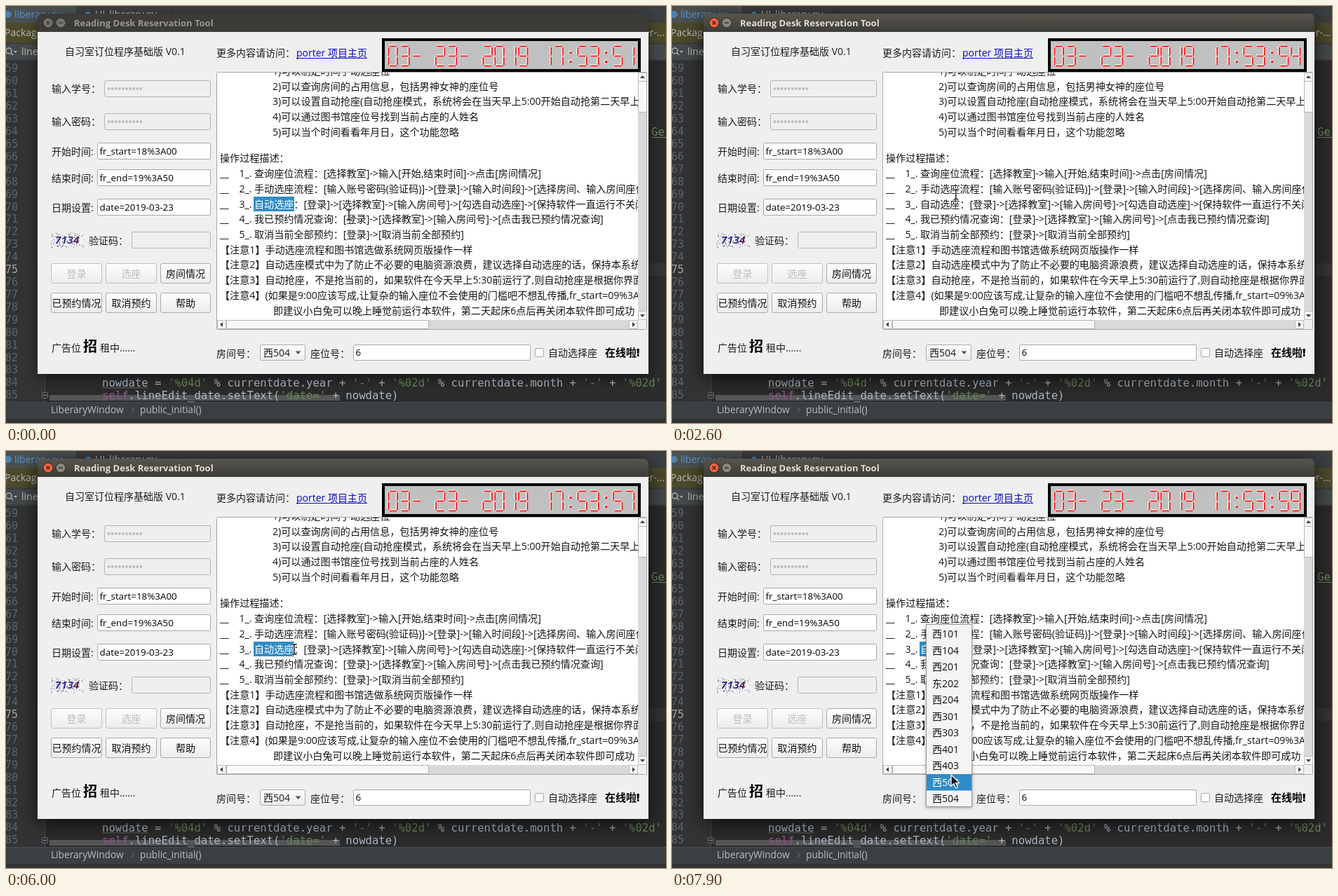
Write an HTML page with a canvas that moves like this. It is 941 px wide and 595 px high and loops after 8000 ms.

```html
<!DOCTYPE html>
<html lang="zh-CN">
<head>
<meta charset="utf-8">
<title>Reading Desk</title>
<style>
html, body { margin: 0; width: 100%; height: 100%; overflow: hidden; background: #2b2b2b; }
canvas { display: block; }
</style>
</head>
<body>
<canvas id="stage" width="941" height="595"></canvas>
<script>
const ctx = document.getElementById('stage').getContext('2d');
const LOOP = 8000;
const SANS = '"Open Sans", "Noto Sans CJK SC", "Noto Sans CJK JP", sans-serif';
const MONO = '"DejaVu Sans Mono", monospace';
const BLUE = '#308cc6';

function rect(x, y, w, h, fill) {
  ctx.fillStyle = fill;
  ctx.fillRect(x, y, w, h);
}

// Text is placed by its left edge and vertical middle.
function text(s, x, y, { size = 14, color = '#1c1c1c', weight = 400, family = SANS, align = 'left' } = {}) {
  ctx.font = `${weight} ${size}px ${family}`;
  ctx.fillStyle = color;
  ctx.textAlign = align;
  ctx.fillText(s, x, y + size * 0.36);
  return ctx.measureText(s).width;
}

function box(x, y, w, h, fill, border, r = 2) {
  ctx.beginPath();
  ctx.roundRect(x + 0.5, y + 0.5, w - 1, h - 1, r);
  ctx.fillStyle = fill;
  ctx.fill();
  ctx.strokeStyle = border;
  ctx.lineWidth = 1;
  ctx.stroke();
}

function poly(points, fill, stroke, width = 1) {
  ctx.beginPath();
  points.forEach(([x, y]) => ctx.lineTo(x, y));
  ctx.closePath();
  if (fill) { ctx.fillStyle = fill; ctx.fill(); }
  if (stroke) { ctx.strokeStyle = stroke; ctx.lineWidth = width; ctx.stroke(); }
}

function line(points, color, width) {
  ctx.beginPath();
  points.forEach(([x, y]) => ctx.lineTo(x, y));
  ctx.strokeStyle = color;
  ctx.lineWidth = width;
  ctx.stroke();
}

function disc(x, y, r, fill) {
  ctx.beginPath();
  ctx.arc(x, y, r, 0, 7);
  ctx.fillStyle = fill;
  ctx.fill();
}

function vertical(y0, y1, a, b) {
  const g = ctx.createLinearGradient(0, y0, 0, y1);
  g.addColorStop(0, a);
  g.addColorStop(1, b);
  return g;
}

function random(seed) {
  return () => (seed = (seed * 16807) % 2147483647) / 2147483647;
}

// ---------- code editor behind the window ----------

function code(parts, x, y) {
  for (const [s, color] of parts) x += text(s, x, y, { size: 15.6, color, family: MONO });
}

function drawEditor() {
  const plain = '#a9b7c6', green = '#6a8759';
  rect(0, 0, 941, 595, '#2b2b2b');
  rect(0, 0, 941, 24, '#3c3f41');
  rect(0, 0, 100, 24, '#4b5052');
  rect(235, 0, 1, 24, '#323232');
  disc(3, 12, 5, '#4a82ad');
  text('liberary.py', 12, 12, { color: '#5c94c8' });
  disc(117, 12, 4, '#4a82ad');
  text('UI_liberary.py', 127, 12, { color: '#bbbbbb' });
  rect(0, 24, 941, 28, '#4c4a2a');
  text('Package', -2, 38, { color: '#bbbbbb' });
  text('er-...', 910, 38, { color: '#bbbbbb' });
  rect(0, 52, 941, 26, '#3c3f41');
  rect(0, 55, 941, 21, '#45494a');
  ctx.beginPath();
  ctx.arc(4, 64, 4, 0, 7);
  ctx.strokeStyle = '#afb1b3';
  ctx.lineWidth = 1.5;
  ctx.stroke();
  line([[7, 67], [10, 70]], '#afb1b3', 1.5);
  poly([[11, 64], [16, 64], [13.5, 67]], '#afb1b3');
  text('line', 22, 65, { color: '#bbbbbb' });

  rect(0, 78, 56, 487, '#313335');
  rect(0, 367, 941, 18, '#343434');
  rect(55, 78, 1, 487, '#484848');
  for (let n = 59; n <= 85; n++) {
    text(String(n), -1, 89 + (n - 59) * 17.92, { size: 15, color: n === 75 ? '#a4a3a3' : '#606366', family: MONO });
  }
  code([['Ge', green]], 920, 179);
  rect(920, 187, 21, 1, '#6a8759');

  code([['nowdate = ', plain], ["'%04d'", green], [' % currentdate.year + ', plain], ["'-'", green],
    [' + ', plain], ["'%02d'", green], [' % currentdate.month + ', plain], ["'-'", green],
    [' + ', plain], ["'%02d'", green]], 137, 537);
  const wave = Array.from({ length: 34 }, (_, i) => [137 + i * 2, 544 + (i % 2) * 1.5]);
  line(wave, '#77776a', 0.8);
  rect(62, 555, 414, 8, 'rgba(120,122,124,.55)');
  code([['self', '#94558d'], ['.lineEdit_date.setText(', plain], ["'date='", green], [' + nowdate)', plain]], 137, 555);
  box(51, 551, 9, 9, '#313335', '#6a6d70', 1);
  line([[53, 555.5], [58, 555.5]], '#8a8d90', 1);

  rect(0, 565, 941, 24, '#3c3f41');
  rect(0, 565, 941, 1, '#4a4d4f');
  rect(0, 589, 941, 6, '#313335');
  text('LiberaryWindow', 64, 576, { size: 13.7, color: '#bbbbbb' });
  line([[179, 573], [182, 576.5], [179, 580]], '#77797b', 1);
  text('public_initial()', 191, 576, { size: 13.7, color: '#bbbbbb' });
}

// ---------- window frame ----------

function drawFrame(focused) {
  ctx.save();
  ctx.shadowColor = focused ? 'rgba(0,0,0,.75)' : 'rgba(0,0,0,.55)';
  ctx.shadowBlur = focused ? 28 : 18;
  ctx.shadowOffsetY = 5;
  ctx.beginPath();
  ctx.roundRect(45, 11, 871, 514, [7, 7, 0, 0]);
  ctx.fillStyle = '#3c3b37';
  ctx.fill();
  ctx.restore();
  ctx.beginPath();
  ctx.roundRect(45, 11, 871, 27, [7, 7, 0, 0]);
  ctx.fillStyle = focused ? vertical(11, 37, '#57554d', '#3d3c38') : '#3c3b37';
  ctx.fill();
  rect(45, 37, 871, 488, '#efefef');

  const mark = focused ? '#3a2a22' : '#3c3b37';
  disc(60, 24, 7.5, focused ? '#2f2e2a' : '#34332f');
  disc(60, 24, 6.5, focused ? '#ee6540' : '#777570');
  line([[57.5, 21.5], [62.5, 26.5]], mark, 1.5);
  line([[62.5, 21.5], [57.5, 26.5]], mark, 1.5);
  disc(78, 24, 7.5, focused ? '#2f2e2a' : '#34332f');
  disc(78, 24, 6.5, focused ? '#8a877c' : '#777570');
  line([[75, 24], [81, 24]], mark, 1.5);
  text('Reading Desk Reservation Tool', 97, 24, { size: 13, weight: 700, color: focused ? '#dfdbd2' : '#99968c' });
}

// ---------- form ----------

function field(x, y, w, h, value = '', enabled = true) {
  box(x, y, w, h, enabled ? '#ffffff' : '#efefef', enabled ? '#a8a8a8' : '#b4b4b4');
  text(value, x + 3.5, y + h / 2, { size: 13.4, color: '#000' });
}

function button(x, y, w, label, enabled = true) {
  box(x, y, w, 29, vertical(y, y + 29, '#fdfdfd', '#ececec'), enabled ? '#ababab' : '#c0c0c0', 2.5);
  text(label, x + w / 2, y + 14.5, { color: enabled ? '#111' : '#bebebe', align: 'center' });
}

function drawCaptcha() {
  const rnd = random(4211);
  rect(64, 324, 47, 21, '#f3f3f5');
  for (let i = 0; i < 150; i++) {
    rect(64 + Math.floor(rnd() * 47), 324 + Math.floor(rnd() * 21), 1, 1, i % 3 ? '#9c9cab' : '#555566');
  }
  [...'7134'].forEach((d, i) => text(d, 70 + i * 8.7, 334, {
    size: 15, weight: 'italic 700', color: i < 3 ? '#2c2c8e' : '#5a234f'
  }));
}

function drawForm() {
  text('自习室订位程序基础版 V0.1', 84, 65);
  text('更多内容请访问：', 300, 67);
  const w = text('porter 项目主页', 414, 67, { color: '#0909c8' });
  rect(414, 74, w, 1, '#0909c8');

  [['输入学号：', 117], ['输入密码：', 164]].forEach(([label, y]) => {
    text(label, 65, y + 1);
    field(140, y - 11, 152, 24, '', false);
    for (let i = 0; i < 10; i++) disc(146.5 + i * 5.1, y + 1, 2, '#bebebe');
  });
  [['开始时间:', 'fr_start=18%3A00', 207], ['结束时间:', 'fr_end=19%3A50', 245], ['日期设置:', 'date=2019-03-23', 287]]
    .forEach(([label, value, y]) => {
      text(label, 65, y + 1);
      field(130, y - 12, 162, 24, value);
    });
  drawCaptcha();
  text('验证码：', 118, 335);
  field(179, 322, 113, 24, '', false);

  button(64, 367, 73, '登录', false);
  button(142, 367, 73, '选座', false);
  button(220, 367, 72, '房间情况');
  button(64, 409, 73, '已预约情况');
  button(142, 409, 73, '取消预约');
  button(220, 409, 72, '帮助');

  text('广告位', 65, 488);
  text('招', 110, 486, { size: 20, weight: 900, color: '#000' });
  text('租中......', 134, 488);

  text('房间号：', 300, 496);
  box(362, 483, 65, 23, vertical(483, 506, '#fdfdfd', '#ececec'), '#ababab');
  text('西504', 367, 495);
  poly([[412.5, 492.5], [420.5, 492.5], [416.5, 497]], '#555');
  text('座位号：', 434, 496);
  field(495, 483, 253, 23, '6');
  box(754, 488, 13, 13, '#fff', '#a8a8a8', 1);
  text('自动选择座', 773, 495);
  text('在线啦!', 854, 495, { size: 15, weight: 900, color: '#000' });
}

// ---------- clock ----------

// Segments in order: top, upper left, upper right, middle, lower left, lower right, bottom.
const SEGMENTS = [[0, 0, 1, 0], [0, 0, 0, 1], [1, 0, 1, 1], [0, 1, 1, 1], [0, 1, 0, 2], [1, 1, 1, 2], [0, 2, 1, 2]];
const DIGITS = {
  0: '012456', 1: '25', 2: '02346', 3: '02356', 4: '1235', 5: '01356',
  6: '013456', 7: '025', 8: '0123456', 9: '012356', '-': '3'
};

function drawDigit(ch, x) {
  const w = 12.5, h = 14, top = 57;
  if (ch === ':') {
    [65, 78].forEach(y => { rect(x + 4.5, y - 1, 4, 4, '#fff'); rect(x + 5.5, y, 3, 3, '#f00808'); });
    return;
  }
  for (const s of DIGITS[ch] || '') {
    const [x0, y0, x1, y1] = SEGMENTS[s];
    const gapX = x0 === x1 ? 0 : 1.3, gapY = y0 === y1 ? 0 : 1.3;
    const from = [x + x0 * w + gapX, top + y0 * h + gapY];
    const to = [x + x1 * w - gapX, top + y1 * h - gapY];
    line([from, to], '#fff4f2', 3.4);
    line([[from[0] + 0.5, from[1] + 0.5], [to[0] + 0.5, to[1] + 0.5]], '#f00808', 1.7);
  }
}

function drawClock(t) {
  const seconds = t < 300 ? 51 : 52 + Math.floor((t - 300) / 1000);
  rect(536, 46, 369, 48, '#000');
  rect(540, 50, 361, 40, '#c0c0c0');
  [...`03- 23- 2019 17:53:${seconds}`].forEach((ch, i) => drawDigit(ch, 545 + i * 16.87));
}

// ---------- help text ----------

const RULES = [
  '1)可以制定时间手动选座位',
  '2)可以查询房间的占用信息，包括男神女神的座位号',
  '3)可以设置自动抢座(自动抢座模式，系统将会在当天早上5:00开始自动抢第二天早上的座位',
  '4)可以通过图书馆座位号找到当前占座的人姓名',
  '5)可以当个时间看看年月日，这个功能忽略'
];
const STEPS = [
  '查询座位流程：[选择教室]->输入[开始,结束时间]->点击[房间情况]',
  '手动选座流程：[输入账号密码(验证码)]->[登录]->[输入时间段]->[选择房间、输入房间座位号]',
  '自动选座：[登录]->[选择教室]->[输入房间号]->[勾选自动选座]->[保持软件一直运行不关闭]',
  '我已预约情况查询：[登录]->[选择教室]->[输入房间号]->[点击我已预约情况查询]',
  '取消当前全部预约：[登录]->[取消当前全部预约]'
];
const NOTES = [
  '手动选座流程和图书馆选做系统网页版操作一样',
  '自动选座模式中为了防止不必要的电脑资源浪费，建议选择自动选座的话，保持本系统运行',
  '自动抢座，不是抢当前的，如果软件在今天早上5:30前运行了,则自动抢座是根据你界面的设置',
  '(如果是9:00应该写成,让复杂的输入座位不会使用的门槛吧不想乱传播,fr_start=09%3A00)'
];

function drawHelp(selected) {
  const style = { size: 14.1, color: '#151515' }, pitch = 21.7;
  box(300, 94, 614, 368, '#fff', '#a8a8a8', 1);
  ctx.save();
  ctx.beginPath();
  ctx.rect(301, 95, 600, 353);
  ctx.clip();
  RULES.forEach((s, i) => text(s, 380, 93 + i * pitch, style));
  text('操作过程描述：', 305, 217, style);
  STEPS.forEach((s, i) => {
    const y = 239.2 + i * pitch;
    text('__', 305, y, style);
    text(`${i + 1}_.`, 332.4, y, style);
    text(s, 354, y, style);
  });
  NOTES.forEach((s, i) => text(`【注意${i + 1}】${s}`, 305, 347.7 + i * pitch, style));
  text('即建议小白兔可以晚上睡觉前运行本软件，第二天起床6点后再关闭本软件即可成功', 381, 434.5, style);
  if (selected) {
    rect(353, 272, selected * 14.1 + 1.5, 21, BLUE);
    text('自动选座'.slice(0, selected), 354, 239.2 + 2 * pitch, { ...style, color: '#fff' });
  }
  ctx.restore();

  rect(901, 95, 12, 353, '#d9d9d9');
  rect(301, 448, 612, 13, '#d9d9d9');
  rect(901, 448, 12, 13, '#efefef');
  box(901, 95, 13, 13, '#f6f6f6', '#bcbcbc', 0);
  box(901, 435, 13, 13, '#f6f6f6', '#bcbcbc', 0);
  box(901, 107, 13, 45, '#f8f8f8', '#b4b4b4', 0);
  box(301, 448, 13, 13, '#f6f6f6', '#bcbcbc', 0);
  box(888, 448, 13, 13, '#f6f6f6', '#bcbcbc', 0);
  box(314, 448, 289, 13, '#f8f8f8', '#b4b4b4', 0);
  poly([[904, 103], [911, 103], [907.5, 99]], '#444');
  poly([[904, 440], [911, 440], [907.5, 444]], '#444');
  poly([[309, 451], [309, 458], [305, 454.5]], '#444');
  poly([[893, 451], [893, 458], [897, 454.5]], '#444');
}

// ---------- room list ----------

const ROOMS = ['西101', '西104', '西201', '东202', '西204', '西301', '西303', '西401', '西403', '西503', '西504'];

function drawRooms(current) {
  ctx.save();
  ctx.shadowColor = 'rgba(0,0,0,.35)';
  ctx.shadowBlur = 4;
  ctx.shadowOffsetY = 1;
  rect(362, 247, 66, 261, '#9a9a9a');
  ctx.restore();
  rect(363, 248, 64, 259, '#f4f4f4');
  ROOMS.forEach((room, i) => {
    const y = 261 + i * 23.5;
    if (i === current) rect(363, y - 11.5, 64, 23.5, BLUE);
    text(room, 371, y, { color: i === current ? '#fff' : '#111' });
  });
}

// ---------- pointer ----------

const PATH = [
  [400, 489, 298], [900, 442, 294], [1300, 495, 281], [1600, 495, 281], [2000, 440, 289], [2300, 411, 270],
  [2500, 411, 270], [3000, 380, 264], [3400, 375, 254], [3900, 342, 270], [4300, 400, 257], [4700, 356, 285],
  [4800, 356, 285], [5600, 411, 283], [6000, 411, 283], [6400, 237, 374], [6800, 336, 370], [7100, 372, 536],
  [7500, 395, 491], [7600, 402, 497], [7700, 402, 497], [7800, 437, 487], [7900, 398, 462]
];

function pointerAt(t) {
  const next = PATH.findIndex(p => p[0] > t);
  if (next === 0) return PATH[0].slice(1);
  if (next < 0) return PATH[PATH.length - 1].slice(1);
  const [t0, x0, y0] = PATH[next - 1], [t1, x1, y1] = PATH[next];
  const k = (t - t0) / (t1 - t0);
  return [x0 + (x1 - x0) * k, y0 + (y1 - y0) * k];
}

function drawBeam(x, y) {
  for (const [color, width] of [['#fff', 3], ['#111', 1.4]]) {
    line([[x, y - 6.5], [x, y + 6.5]], color, width);
    line([[x - 3.5, y - 7.5], [x, y - 6.5], [x + 3.5, y - 7.5]], color, width);
    line([[x - 3.5, y + 7.5], [x, y + 6.5], [x + 3.5, y + 7.5]], color, width);
  }
}

function drawArrow(x, y) {
  const shape = [[0, 0], [0, 16], [3.8, 12.5], [6.5, 19], [9.2, 17.8], [6.5, 11.6], [11.5, 11.4]];
  poly(shape.map(([dx, dy]) => [x + dx, y + dy]), '#1a1a1a', '#fff', 1.3);
}

function selectedChars(t, x) {
  if (t < 1500) return 4;
  if (t < 4900) return 0;
  if (t >= 5600) return 4;
  return Math.max(0, Math.min(4, Math.round((x - 354) / 14.1)));
}

function draw(now) {
  const t = Math.floor((now % LOOP) / 100) * 100;
  const [x, y] = pointerAt(t);
  const listOpen = t >= 7600;
  drawEditor();
  drawFrame(t >= 1500);
  drawForm();
  drawHelp(selectedChars(t, x));
  drawClock(t);
  if (listOpen) drawRooms(t >= 7900 ? 9 : 10);
  const overText = x > 300 && x < 901 && y > 95 && y < 448;
  (overText && !listOpen ? drawBeam : drawArrow)(x, y);
}

let start;
function tick(now) {
  start ??= now;
  draw(Math.max(0, now - start));
  requestAnimationFrame(tick);
}
draw(0);
requestAnimationFrame(tick);
</script>
</body>
</html>
```
